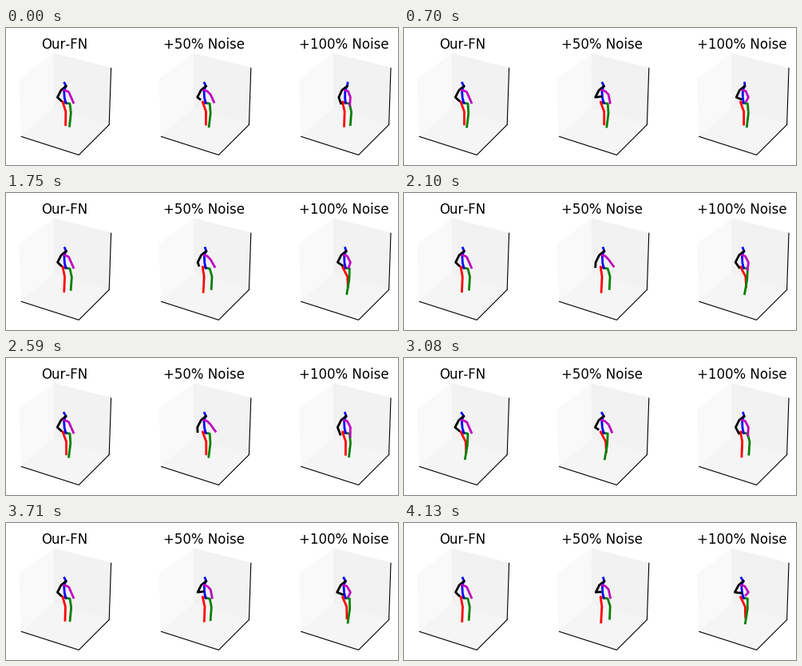
A matplotlib script that plays this animation: 491 by 172 pixels, repeating every 4.2 s.

```python
import numpy as np
import matplotlib.pyplot as plt
from matplotlib.animation import FuncAnimation

W, H, DPI = 491, 172, 100
FRAMES, INTERVAL = 60, 70
PANEL_STEP = 175.2
ARM_PERIOD = 44

# Frames at which the stride of each walker is set:
# +1 right leg back and left leg forward, -1 the reverse
KEYS = np.array([0, 10, 19, 30, 44, 53, 59])

# Per walker: body lean at start and end, frame of the arm swing's peak,
# and (rest, swing) for each wrist
WALKERS = [
    dict(title="Our-FN", stride=[-0.2, 0.1, -0.4, -0.9, 0.9, -0.4, -0.8],
         lean=(-1, -1.2), peak=0, l_elbow=(78.7, 80.5),
         r_wrist=((69, 91.3), (0, 0)), l_wrist=((84.5, 93.7), (0, 0))),
    dict(title="+50% Noise", stride=[0, 0.1, -0.7, -1.1, 1, -0.7, -1.2],
         lean=(-0.7, -0.5), peak=11, l_elbow=(81, 83.5),
         r_wrist=((67.8, 89.5), (3.6, -3.5)), l_wrist=((85.2, 93), (-2.3, 1))),
    dict(title="+100% Noise", stride=[-0.7, 0, 0.5, 1, -0.9, 0.45, 0.7],
         lean=(3, -1.4), peak=16, l_elbow=(81, 87),
         r_wrist=((70.3, 92), (2, -4)), l_wrist=((79.3, 94.5), (-1.5, -4))),
]

# Projected corners of the box
LEFT_TOP, LEFT_LOW = (17.2, 64), (19.3, 136.3)
BACK_TOP, BACK_LOW = (60.2, 32.3), (60.7, 101)
RIGHT_TOP, RIGHT_LOW = (131.6, 50.4), (129.2, 121.4)
FRONT_LOW = (91.2, 159.4)
PANES = [
    ((LEFT_TOP, BACK_TOP, BACK_LOW, LEFT_LOW), "0.975"),
    ((BACK_TOP, RIGHT_TOP, RIGHT_LOW, BACK_LOW), "0.95"),
    ((LEFT_LOW, FRONT_LOW, RIGHT_LOW, BACK_LOW), "0.9625"),
]
COLORS = "rgbkm"


def smooth(values, t):
    """Cubic Hermite curve through values at KEYS."""
    slopes = np.gradient(values, KEYS)
    i = min(np.searchsorted(KEYS, t, side="right") - 1, len(KEYS) - 2)
    span = KEYS[i + 1] - KEYS[i]
    u = (t - KEYS[i]) / span
    rise = u * u * (3 - 2 * u)
    return (values[i] * (1 - rise) + values[i + 1] * rise
            + span * u * (1 - u) * ((1 - u) * slopes[i] - u * slopes[i + 1]))


def swing(rest, move, amount):
    return np.add(rest, np.multiply(move, amount))


def limbs(walker, t):
    """Joint chains for right leg, left leg, spine, right arm, left arm."""
    s = smooth(walker["stride"], t)
    arm = np.cos(2 * np.pi * (t - walker["peak"]) / ARM_PERIOD)
    lean = np.interp(t, (0, FRAMES - 1), walker["lean"]) - 0.8 * s

    hip = (75, 94)
    neck = (75.5 + 0.4 * lean, 73)
    chest = (73 + 0.4 * lean, 78)
    return [
        [hip, (71, 92.7), swing((75.3, 105), (2.2, 0), s),
         swing((75.2, 121), (3, -3), s)],
        [hip, (80, 95), swing((81, 107), (-1.7, 2), s),
         swing((79, 123.7), (-2.8, 3), s)],
        [(74 + lean, 69), neck, chest, (73.5 + 0.2 * lean, 88), hip],
        [neck, (69.3 + 0.3 * lean, 78), (64.8 + 0.45 * lean, 87),
         swing(*walker["r_wrist"], arm)],
        [chest, (77 + 0.3 * lean, 79.3), walker["l_elbow"],
         swing(*walker["l_wrist"], arm)],
    ]


plt.rcParams["text.kerning_factor"] = 6
fig = plt.figure(figsize=(W / DPI, H / DPI), dpi=DPI, facecolor="white")
ax = fig.add_axes([0, 0, 1, 1])
ax.set_xlim(0, W)
ax.set_ylim(H, 0)
ax.axis("off")

figures = []
for n, walker in enumerate(WALKERS):
    shift = (n * PANEL_STEP, 0)
    for corners, shade in PANES:
        ax.fill(*np.add(corners, shift).T, fc=shade, ec=shade, lw=0.8)
    for edge in ((LEFT_LOW, FRONT_LOW, RIGHT_LOW), (RIGHT_LOW, RIGHT_TOP)):
        ax.plot(*np.add(edge, shift).T, color="k", lw=0.8)
    ax.text(shift[0] + 73, 26, walker["title"], fontsize=12, ha="center",
            va="baseline", family="DejaVu Sans")
    lines = [ax.plot([], [], color=c, lw=2, solid_joinstyle="round",
                     solid_capstyle="projecting")[0] for c in COLORS]
    figures.append((walker, shift, lines))


def update(frame):
    artists = []
    for walker, shift, lines in figures:
        for line, chain in zip(lines, limbs(walker, frame)):
            line.set_data(*np.add(chain, shift).T)
        artists += lines
    return artists


anim = FuncAnimation(fig, update, frames=FRAMES, interval=INTERVAL,
                     repeat=True, repeat_delay=0)
plt.show()
```
